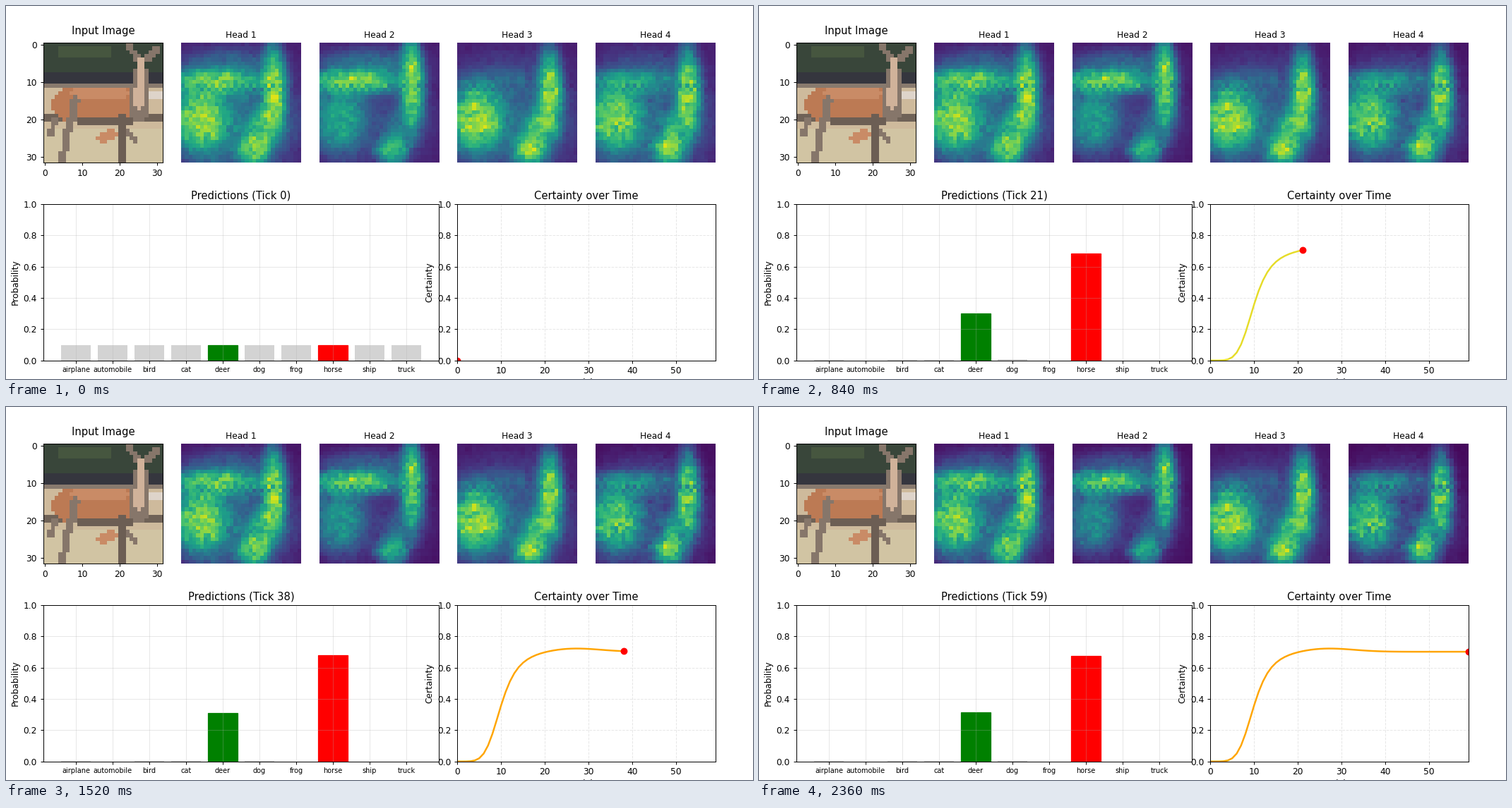
Recreate the animation shown at these times as a matplotlib script. Size 1058 by 529 pixels, loop 2400 ms.

```python
import numpy as np
import matplotlib.pyplot as plt
from matplotlib.animation import FuncAnimation

W, H, TICKS = 1058, 529, 60
CLASSES = ["airplane", "automobile", "bird", "cat", "deer",
           "dog", "frog", "horse", "ship", "truck"]
DEER, HORSE = CLASSES.index("deer"), CLASSES.index("horse")

plt.rcParams.update({"font.family": "DejaVu Sans", "font.size": 10})
fig = plt.figure(figsize=(12, 6), dpi=W / 12, facecolor="white")
cols, rows = np.meshgrid(np.arange(32), np.arange(32))


def add_axes(left, top, right, bottom):
    return fig.add_axes([left / W, 1 - bottom / H, (right - left) / W, (bottom - top) / H])


# --- input picture: flat bands and thick strokes on a 32 x 32 grid ---
def build_picture():
    img = np.zeros((32, 32, 3))
    brown, light_brown, tan = "#bc7a54", "#c98b66", "#d0b29a"
    dark, grey = "#6c5e54", "#86766a"

    def paint(mask, color):
        img[mask] = np.array([int(color[i:i + 2], 16) for i in (1, 3, 5)]) / 255

    def band(color, top, bottom, left=0, right=32):
        paint((rows >= top) & (rows < bottom) & (cols >= left) & (cols < right), color)

    def stroke(color, x0, y0, x1, y1, width):
        dx, dy = x1 - x0, y1 - y0
        along = np.clip(((cols - x0) * dx + (rows - y0) * dy) / (dx * dx + dy * dy), 0, 1)
        paint(np.hypot(cols - x0 - along * dx, rows - y0 - along * dy) <= width / 2, color)

    band("#39463a", 0, 8)
    band("#46563f", 1, 4, 4, 18)
    band("#35363e", 8, 11)
    band("#887a6e", 11, 12)
    band("#ceba9c", 12, 32)
    band("#ded4ca", 13, 15, 28)
    band("#6f6257", 19, 21)
    band("#d1c4a3", 23, 32)
    # body
    stroke(brown, 6, 16, 21, 16, 8.4)
    stroke(light_brown, 8, 13, 21, 13, 2.4)
    stroke(dark, 9, 20.5, 23, 20.5, 2.2)
    # legs
    stroke(grey, 2.5, 20, 1.5, 24, 1.6)
    stroke(grey, 8, 15, 6.5, 22, 2.2)
    stroke(grey, 6, 23, 4.5, 31, 2)
    stroke(dark, 20.5, 20, 20.5, 31, 2.4)
    stroke(grey, 22, 23, 24, 26, 1.4)
    stroke(light_brown, 15, 25, 18, 24, 2.6)
    # neck, head and ears
    stroke(grey, 25.5, 8, 25, 18, 4.6)
    stroke(grey, 22, 0, 25, 4, 1.8)
    stroke(grey, 30, 1, 27, 4, 1.8)
    stroke(tan, 25.5, 5, 25, 16, 2.4)
    return img


# --- attention maps: shared regions (x, y, half width, half height), weighted per head ---
REGIONS = {
    "back": (8, 10, 13, 3.3), "flank": (4.5, 20, 7.5, 9), "neck": (24.3, 12.5, 3.4, 9.5),
    "spur": (24, 3, 2.8, 5), "foot": (19, 28, 4.5, 4), "shank": (22, 22, 5, 5),
    "haze": (14, 20, 17, 15), "top": (12, 6, 14, 5),
}


def build_head(seed, **weights):
    rng = np.random.default_rng(seed)
    rest = np.full((32, 32), 0.92)
    for name, weight in weights.items():
        x, y, half_w, half_h = REGIONS[name]
        r2 = ((cols - x) / half_w) ** 2 + ((rows - y) / half_h) ** 2
        rest *= 1 - weight * np.exp(-r2 ** 1.5)
    patches = np.kron(rng.normal(0, 0.05, (16, 16)), np.ones((2, 2)))
    grain = patches + rng.normal(0, 0.06, rest.shape)
    checker = (cols + rows) % 2 * ((rows == 11) | (rows == 12))
    return np.clip((1 - rest) * (1 + grain - 0.16 * checker), 0.02, 0.95)


heads = [
    build_head(1, back=.65, flank=.76, neck=.78, spur=.3, foot=.75, shank=.55, haze=.33, top=.22),
    build_head(2, back=.72, flank=.5, neck=.72, spur=.55, foot=.58, shank=.25, haze=.13, top=.3),
    build_head(3, back=.12, flank=.77, neck=.77, spur=.2, foot=.78, shank=.55, haze=.27, top=.03),
    build_head(4, back=.4, flank=.7, neck=.74, spur=.22, foot=.7, shank=.45, haze=.27, top=.1),
]
FADES = [0.25, 0.35, 0.15, 0.5]


# --- certainty curve and class probabilities ---
def bump(t, centre, width):
    return np.exp(-((t - centre) / width) ** 2)


def certainty(t):
    rise = t ** 5.1 / (t ** 5.1 + 9.9 ** 5.1)
    return rise * (0.702 + 0.025 * bump(t, 26, 9))


minor = np.full(10, 0.022)
for name, weight in {"airplane": .13, "bird": .22, "cat": .17, "dog": .39}.items():
    minor[CLASSES.index(name)] = weight


def probabilities(tick):
    """Even at first, sharpening until tick 12, then settling on two classes."""
    t = max(tick, 12)
    decay = np.exp((12 - t) / 3.5)
    spread = 0.11 * decay + 0.008
    deer_share = 0.319 - 0.035 * bump(t, 27, 8.5) + 0.09 * decay
    p = minor * spread
    p[DEER] = (1 - spread) * deer_share
    p[HORSE] = (1 - spread) * (1 - deer_share)
    p **= min(1, np.sqrt(certainty(tick) / certainty(12)))
    return p / p.sum()


# --- layout ---
LEFT, PITCH, SIZE, RIGHT = 52.6, 195.6, 169.6, 1005
ax = add_axes(LEFT, 52, LEFT + SIZE, 222)
ax.imshow(build_picture(), aspect="auto", interpolation="nearest")
ax.set_title("Input Image", pad=10)

maps = []
for i, data in enumerate(heads, 1):
    x = LEFT + i * PITCH
    ax = add_axes(x, 52, x + SIZE, 222)
    maps.append(ax.imshow(data, cmap="viridis", vmin=0, vmax=1, aspect="auto", interpolation="nearest"))
    ax.set_title(f"Head {i}", fontsize=10)
    ax.axis("off")

pred = add_axes(LEFT, 281, LEFT + 2 * PITCH + SIZE, 502.7)
bars = pred.bar(CLASSES, [0.1] * 10, color="lightgray")
for index, color in ((DEER, "green"), (HORSE, "red")):
    bars[index].set(facecolor=color, edgecolor=color, linewidth=1)
pred.set_ylim(0, 1)
pred.set_ylabel("Probability")
pred.tick_params(axis="x", labelsize=8)
pred.grid(alpha=0.3)
pred_title = pred.set_title("")

cert = add_axes(LEFT + 3 * PITCH, 281, RIGHT, 502.7)
cert.set(xlim=(0, TICKS - 1), ylim=(0, 1), ylabel="Certainty", title="Certainty over Time")
cert.set_xlabel("Tick", labelpad=2.8)
cert.grid(linestyle="--", alpha=0.3)
curve, = cert.plot([], [], lw=2)
dot, = cert.plot([], [], "o", color="red", ms=7)


def update(tick):
    for image, data, fade in zip(maps, heads, FADES):
        image.set_data(data ** (1 + fade * tick / (TICKS - 1)))
    for bar, p in zip(bars, probabilities(tick)):
        bar.set_height(p)
    pred_title.set_text(f"Predictions (Tick {tick})")
    past = np.arange(tick + 1)
    curve.set_data(past, certainty(past))
    curve.set_color("#e6dc28" if tick < 26 else "orange")
    dot.set_data([tick], [certainty(tick)])
    return [*maps, *bars, pred_title, curve, dot]


anim = FuncAnimation(fig, update, frames=TICKS, interval=40, repeat=True, repeat_delay=0, blit=False)
plt.show()
```
